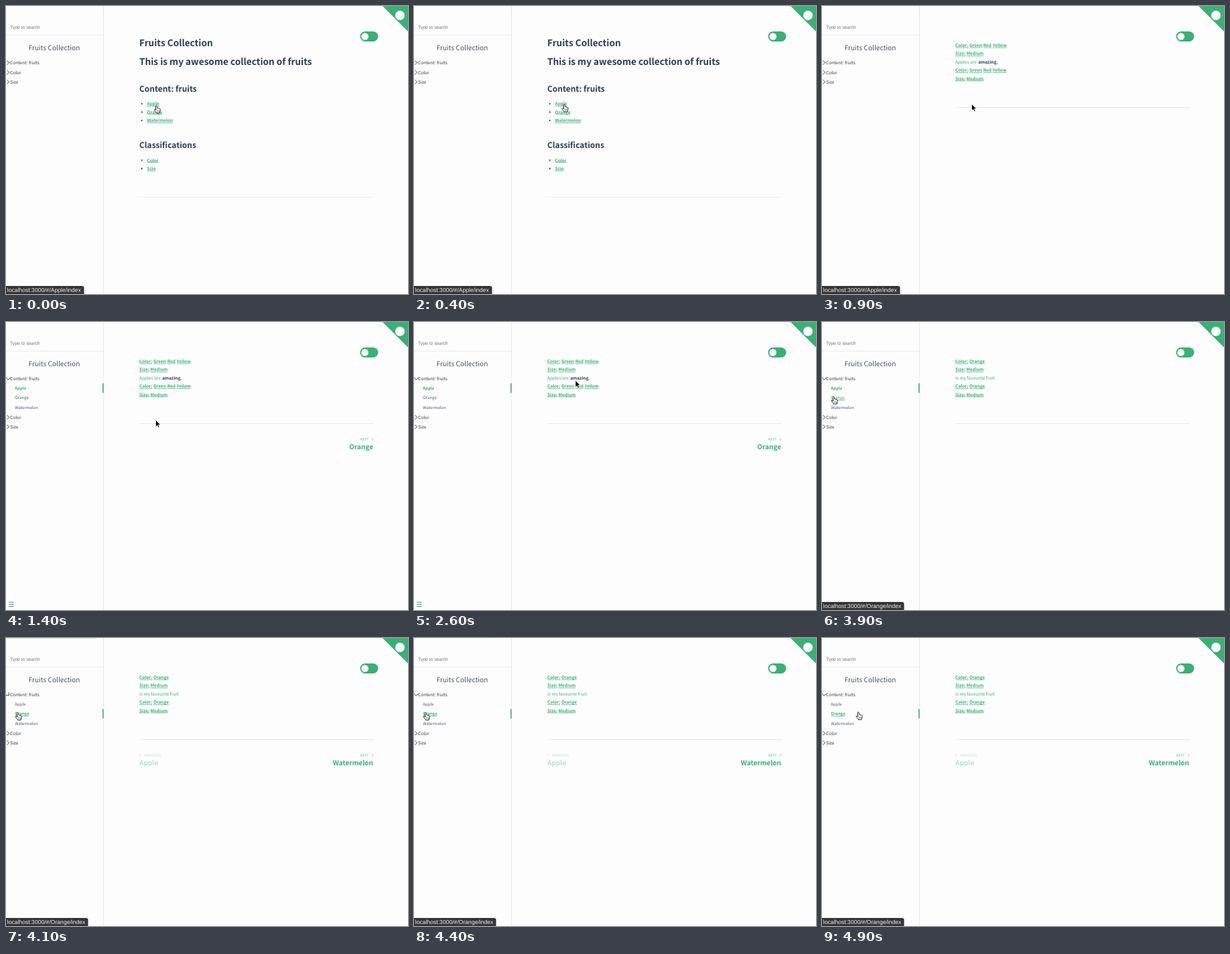
Animation, 600 px wide and 430 px high, one loop 5000 ms. Source, as an HTML page:

```html
<!DOCTYPE html>
<html lang="en">
<head>
<meta charset="utf-8">
<title>Fruits Collection</title>
<style>
  html, body { margin: 0; width: 600px; height: 430px; overflow: hidden; background: #fdfdfe; }
  svg { display: block; }
  text {
    font-family: "Noto Sans CJK JP", "Noto Sans CJK SC", "Noto Sans CJK", "Noto Sans", sans-serif;
    text-rendering: geometricPrecision;
    white-space: pre;
  }
  text.ui { font-family: "Liberation Sans", Arial, sans-serif; }
</style>
</head>
<body>
<svg id="stage" width="600" height="430" viewBox="0 0 600 430"></svg>
<script>
const GREEN = '#3bb075', DARK = '#2c3e50', INK = '#303436', GREY = '#505d6b', RULE = '#e8e8ea';
const LOOP = 5000, TICK = 100, CLICKS = [900, 3900];
const stage = document.getElementById('stage');

function add(parent, tag, attrs) {
  const el = document.createElementNS('http://www.w3.org/2000/svg', tag);
  for (const k in attrs) el.setAttribute(k, attrs[k]);
  parent.appendChild(el);
  return el;
}
const group = (parent = stage) => add(parent, 'g', {});
const rect = (g, x, y, width, height, fill, rx = 0) => add(g, 'rect', { x, y, width, height, fill, rx });
const line = (g, d, stroke, w) => add(g, 'path', { d, stroke, 'stroke-width': w, fill: 'none' });
const show = (el, on) => el.setAttribute('visibility', on ? 'visible' : 'hidden');

function text(g, x, y, str, size, fill, attrs = {}) {
  const el = add(g, 'text', { x, y, 'font-size': size, fill, ...attrs });
  el.textContent = str;
  return el;
}
const bold = (g, x, y, str, size, fill, attrs) =>
  text(g, x, y, str, size, fill, { 'font-weight': 700, ...attrs });

function underline(g, el, x, y) {
  return rect(g, x, y + 0.9, el.getComputedTextLength(), 0.7, GREEN);
}
function link(g, x, y, str) {
  underline(g, bold(g, x, y, str, 6.44, GREEN), x, y);
}

// Fixed frame of the site
rect(stage, 0, 0, 600, 430, '#fdfdfe');
rect(stage, 145, 0, 1, 430, RULE);
rect(stage, 0, 43, 145, 1, '#ececee');
text(stage, 6, 34, 'Type to search', 6.8, '#727272', { class: 'ui' });
text(stage, 72, 66, 'Fruits Collection', 10.1, '#4a5560', { 'text-anchor': 'middle' });
add(stage, 'path', { d: 'M562 0H600V38Z', fill: GREEN });
add(stage, 'circle', { cx: 588, cy: 14, r: 7, fill: '#fff' });
rect(stage, 528.5, 38, 27, 15, GREEN, 7.5);
add(stage, 'circle', { cx: 535.7, cy: 45.5, r: 5.3, fill: '#fff' });
line(stage, 'M4 418.5H12M4 421.5H12M4 424.5H12', GREEN, 1.2);

// Sidebar
function chevron(g, y) {
  return line(g, 'M-1.6 -3.1L1.7 0L-1.6 3.1', INK, 0.9).setAttribute('transform', `translate(3 ${y})`);
}
text(stage, 6, 87.3, 'Content: fruits', 6.55, INK);
const fold = line(stage, 'M-1.6 -3.1L1.7 0L-1.6 3.1', INK, 0.9);

function classes(y) {
  const g = group();
  ['Color', 'Size'].forEach((name, i) => {
    chevron(g, y + i * 14.3);
    text(g, 6, y + 2.6 + i * 14.3, name, 6.55, INK);
  });
  return g;
}
const closedRows = classes(99), openRows = classes(142.2);

const items = ['Apple', 'Orange', 'Watermelon'].map((name, i) => {
  const y = 101 + i * 14.4, g = group();
  const plain = text(g, 13.3, y, name, 6.1, GREY);
  const active = bold(g, 13.3, y, name, 6, GREEN);
  return { g, plain, active, rule: underline(g, active, 13.3, y), mark: rect(g, 144, y - 9.3, 1.6, 14, GREEN) };
});

// Start page
const home = group();
bold(home, 199, 59.6, 'Fruits Collection', 13.6, DARK);
bold(home, 199, 88, 'This is my awesome collection of fruits', 13.6, DARK);
bold(home, 199, 127.7, 'Content: fruits', 11.95, DARK);
bold(home, 199, 212.3, 'Classifications', 11.95, DARK);
function list(y, names) {
  names.forEach((name, i) => {
    const base = y + i * 12.4;
    add(home, 'circle', { cx: 202.7, cy: base - 2.2, r: 1.1, fill: INK });
    link(home, 210.5, base, name);
  });
}
list(148.2, ['Apple', 'Orange', 'Watermelon']);
list(232.5, ['Color', 'Size']);
rect(home, 199, 285, 349, 1, RULE);

// Fruit pages
function fruitPage(colors) {
  const g = group();
  for (const y of [60.9, 98.2]) {
    link(g, 199, y, 'Color:');
    colors.forEach(([name, x]) => link(g, x, y, name));
    link(g, 199, y + 12.4, 'Size:');
    link(g, 215.6, y + 12.4, 'Medium');
  }
  rect(g, 199, 151, 349, 1, RULE);
  return g;
}
const apple = fruitPage([['Green', 220], ['Red', 240.8], ['Yellow', 254.8]]);
text(apple, 199, 85.8, 'Apples are', 6.5, GREEN);
bold(apple, 233.3, 85.8, 'amazing.', 6.44, DARK);
const orange = fruitPage([['Orange', 220]]);
text(orange, 199, 85.8, 'Is my favourite fruit', 6.5, GREEN);

function pager(next, prev) {
  const g = group();
  text(g, 541.5, 177, 'NEXT', 5.25, GREEN, { 'text-anchor': 'end', opacity: 0.75 });
  line(g, 'M546.2 173.2L547.7 175.1L546.2 177', GREEN, 0.6);
  bold(g, 548, 190, next, 10, GREEN, { 'text-anchor': 'end' });
  if (prev) {
    const p = group(g);
    p.setAttribute('opacity', 0.36);
    text(p, 206, 177, 'PREVIOUS', 5.25, GREEN);
    line(p, 'M200.8 173.2L199.3 175.1L200.8 177', GREEN, 0.6);
    bold(p, 199, 190, prev, 10, GREEN);
  }
  return g;
}
const applePager = pager('Orange'), orangePager = pager('Watermelon', 'Apple');

// Browser overlays
function statusBar(page, w) {
  const g = group();
  add(g, 'path', { d: `M0 418H${w - 3}Q${w} 418 ${w} 421V430H0Z`, fill: '#353538' });
  text(g, 1.8, 427.4, `localhost:3000/#/${page}/index`, 8.6, '#f4f4f4', { class: 'ui' });
  return g;
}
const appleBar = statusBar('Apple', 116.5), orangeBar = statusBar('Orange', 122.5);
const progress = rect(stage, 0, 0, 0, 1, GREEN);

const arrow = add(stage, 'path', {
  d: 'M0 0V9.9L2.3 7.8L3.8 11.2L5.4 10.5L3.9 7.2H6.9Z',
  fill: '#000', stroke: '#fff', 'stroke-width': 0.6
});
const hand = group();
add(hand, 'path', {
  d: 'M-1.3 1.3Q-1.2 .2 -.2 .3Q.7 .3 .9 1.3L1.4 4.1Q2.6 3.5 3.2 4.5Q4.3 4 4.8 5.1Q5.9 5 5.8 6.4Q5.9 8.5 4.8 10V11.4H-.3V10.5Q-1.7 9.1 -3.2 7.1Q-3.3 5.7 -2 6L-.5 7.1Z',
  fill: '#fff', stroke: '#111', 'stroke-width': 0.9, 'stroke-linejoin': 'round'
});
line(hand, 'M1 7.6V9.6M2.5 7.6V9.6M3.9 7.6V9.6', '#111', 0.5);

// Pointer stops: time, x, y, hand (1) or arrow (0)
const stops = [
  [0, 224.5, 148.3, 1], [100, 224.5, 147.8, 1], [200, 224.4, 147.3, 1], [300, 224.3, 146.9, 1],
  [400, 224.2, 146.6, 1], [900, 223.5, 146.4, 0], [2400, 225, 141, 0], [2500, 233, 114, 0],
  [2600, 241, 87.3, 0], [2700, 300, 75, 0], [2800, 430, 115, 0], [2900, 518, 178, 1],
  [3000, 533, 41, 1], [3100, 125.5, 83.5, 1], [3300, 106.4, 89.8, 1], [3400, 86, 93.5, 1],
  [3500, 54, 101, 1], [3600, 28, 108, 1], [3700, 17.5, 111, 1], [4700, 27, 110.8, 1],
  [4800, 44, 110.5, 1], [4900, 54.3, 110.4, 1]
];

function drawPointer(t) {
  const [, x, y, isHand] = stops.filter(s => s[0] <= t).pop();
  for (const el of [hand, arrow]) el.setAttribute('transform', `translate(${x} ${y})`);
  show(hand, isHand);
  show(arrow, !isHand);
}

function drawSidebar(t) {
  const open = t >= CLICKS[0] + TICK;
  const since = t - (t < CLICKS[1] + TICK ? CLICKS[0] : CLICKS[1]) - TICK;
  const turn = open ? 90 * Math.sin(Math.min(1, since / 300) * Math.PI / 2) : 0;
  fold.setAttribute('transform', `translate(3 84.6) rotate(${turn})`);
  show(closedRows, !open);
  show(openRows, open);
  const current = t < CLICKS[1] + TICK ? 0 : 1;
  items.forEach((it, i) => {
    const active = open && i === current;
    const hover = open && i === 1 && t >= 3700;
    show(it.plain, open && !active);
    it.plain.setAttribute('fill', hover ? GREEN : GREY);
    show(it.active, active);
    show(it.rule, hover);
    show(it.mark, active);
  });
}

function drawProgress(t) {
  const p = t - (t < CLICKS[1] ? CLICKS[0] : CLICKS[1]);
  const on = p >= 100 && p < (t < CLICKS[1] ? 500 : 600);
  const w = p < 200 ? 557 : p < 300 ? 135 : 118;
  progress.setAttribute('width', on ? w : 0);
  progress.setAttribute('opacity', p < 200 ? 0.7 : p < 300 ? 0.25 : 0.08);
}

function draw(time) {
  const t = Math.floor(time % LOOP / TICK) * TICK;
  const [first, second] = CLICKS;
  show(home, t < first);
  show(apple, t >= first && t < second);
  show(orange, t >= second);
  show(applePager, t >= first + TICK && t < second);
  show(orangePager, t >= second + TICK);
  appleBar.setAttribute('opacity', Math.max(0, Math.min(1, (1400 - t) / 300)));
  show(orangeBar, t >= second);
  drawSidebar(t);
  drawProgress(t);
  drawPointer(t);
}

const start = performance.now();
function frame() {
  draw(performance.now() - start);
  requestAnimationFrame(frame);
}
draw(0);
requestAnimationFrame(frame);
</script>
</body>
</html>
```
